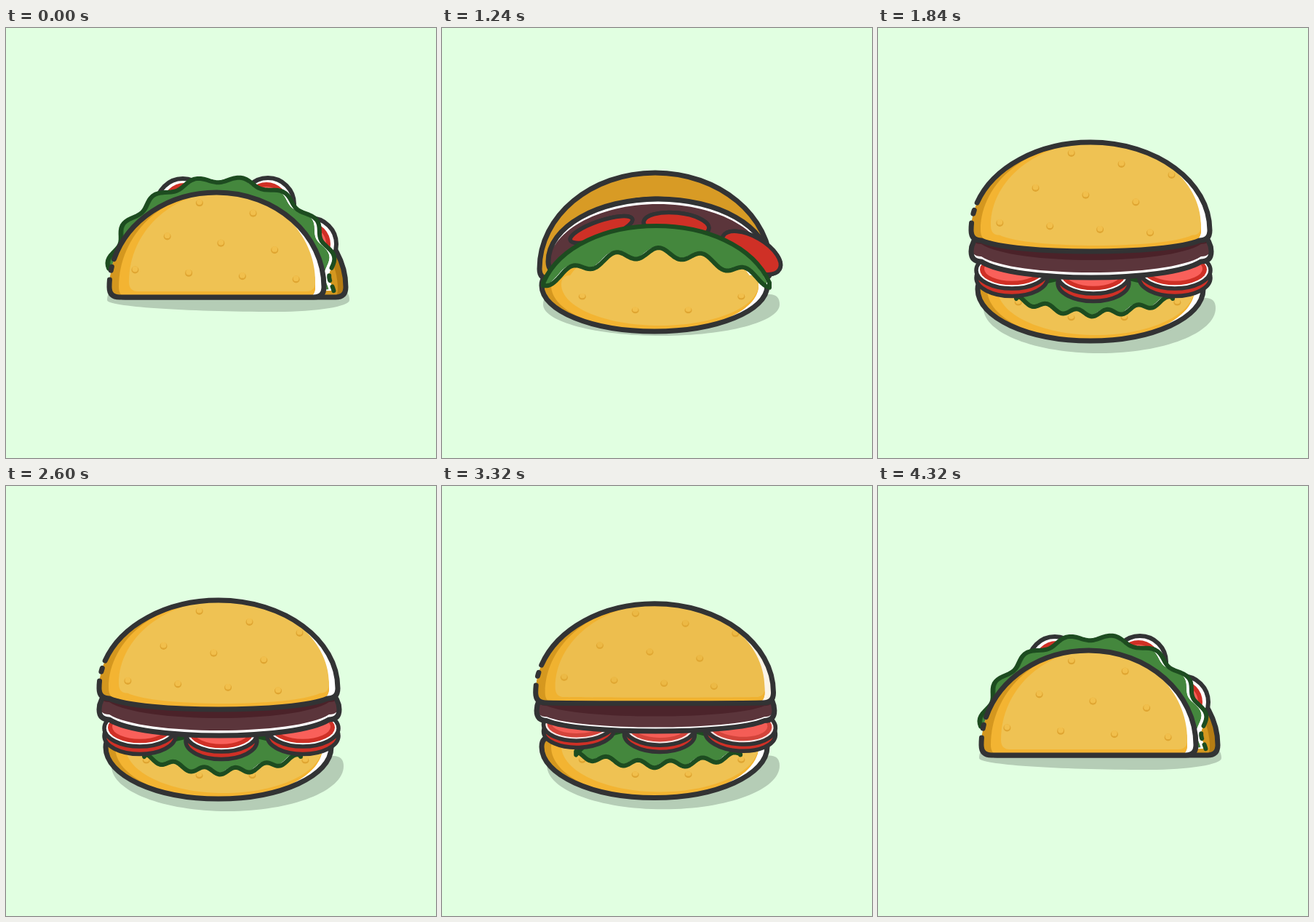
Write an HTML page with a canvas that moves like this. It is 591 px wide and 591 px high and loops after 4.64 s.

```html
<!DOCTYPE html>
<html>
<head>
<meta charset="utf-8">
<style>
html, body { margin: 0; width: 100%; height: 100%; overflow: hidden; background: #e1ffe1; }
canvas { display: block; width: 100vmin; height: 100vmin; }
</style>
</head>
<body>
<canvas></canvas>
<script>
const canvas = document.querySelector('canvas'), c = canvas.getContext('2d');
const LOOP = 4640, STEP = 40, SIZE = 591;
const INK = '#323334', LEAF_INK = '#1d4c20', BUN = '#efc253', ORANGE = '#f3b432',
  AMBER = '#d4971f', RED = '#cf3026', PINK = '#f9605a', SHADE = '#b5cdb6';
const GAPS = [10, 13, 5, 11, 9999];

const { PI, sin, cos, abs, min, max, sign } = Math;
const lerp = (a, b, k) => a.map((v, i) => v + (b[i] - v) * k);
const clamp = k => max(0, min(1, k));

// --- shapes ---

const arch = (x0, x1, y, sag) => {
  const inset = .15 * (x1 - x0), cy = y + sag * 4 / 3;
  return `C${x0 + inset} ${cy} ${x1 - inset} ${cy} ${x1} ${y}`;
};

// Half ellipse from the edge line to its tip (above or below), with round corners
// and a straight edge that bulges by sag.
function dome([left, right, tip, edge, sag, peak = .5]) {
  const q = 14, y = edge + sign(tip - edge) * q, x = left + (right - left) * peak;
  const cy = y + (tip - y) * .552;
  return new Path2D(`M${left} ${y} C${left} ${cy} ${x - (x - left) * .552} ${tip} ${x} ${tip}
    C${x + (right - x) * .552} ${tip} ${right} ${cy} ${right} ${y} Q${right} ${edge} ${right - q} ${edge}
    ${arch(right - q, left + q, edge, sag)} Q${left} ${edge} ${left} ${y}`);
}

function oval(x, y, rx, ry = rx, tilt = 0) {
  const p = new Path2D();
  p.ellipse(x, y, max(1, rx), max(1, ry), tilt, 0, 2 * PI);
  return p;
}

// Polyline through point(u) for u from 0 to 1
function trace(point, n = 120) {
  let d = '';
  for (let i = 0; i <= n; i++) d += (i ? 'L' : 'M') + point(i / n).join(' ');
  return d;
}

// --- painting ---

function fill(path, color, alpha = 1) {
  c.globalAlpha = alpha;
  c.fillStyle = color;
  c.fill(path);
  c.globalAlpha = 1;
}

function line(path, color = INK, width = 7, dash = []) {
  c.strokeStyle = color;
  c.lineWidth = width;
  c.setLineDash(dash);
  c.stroke(path);
}

function within(path, draw) {
  c.save();
  c.clip(path);
  draw();
  c.restore();
}

function dimple(x, y, squash, alpha) {
  fill(oval(x, y, 5, 5 * squash), '#dfa531', alpha);
  fill(oval(x, y - 1.3, 3.9, 3.9 * squash), '#f1bf4c', alpha);
}

// Three slanting rows of dimples, placed in the box of a dome
function rows([left, right, tip, edge, sag], step, alpha = 1) {
  const w = right - left, h = edge + max(0, sag) - tip;
  for (let r = 0; r < 3; r++)
    for (let i = 0; i < 3 + (r > 1); i++)
      dimple(left + w * (.42 - .15 * r + step * i),
        tip + h * (.1 + .32 * r + .1 * i * (1 - .35 * r)), min(1, h / 145), alpha);
}

// Bread: white rim on the right, two darker bands on the left
function bread(shape, drawDimples, dash) {
  const path = dome(shape);
  const [left, right, tip, edge, sag] = shape;
  const w = right - left, y = min(tip, edge), h = max(tip, edge + max(0, sag)) - y;
  within(path, () => {
    fill(path, '#fff');
    for (const [color, x, bottom] of [[AMBER, 0, 0], [ORANGE, 13, 0], [BUN, 27, 8]]) {
      c.save();
      c.translate(left + x, y);
      c.scale((w - x - 12) / w, (h - bottom) / h);
      c.translate(-left, -y);
      fill(path, color);
      c.restore();
    }
    drawDimples();
  });
  line(path, INK, 7, dash);
}

// Lettuce: white on edges facing right, dark on edges facing left
function leaf(path, rim) {
  within(path, () => {
    fill(path, '#fff');
    c.translate(-rim, -rim / 4);
    within(path, () => {
      fill(path, '#28622b');
      c.translate(rim + 4, rim / 4);
      fill(path, '#44873d');
    });
  });
}

// --- taco: k = 0 closed, 1 open ---

function drawTaco(k) {
  fill(dome(lerp([139, 472, 390, 360, 0, .7], [139, 467, 407, 362, 0, .5], k)), SHADE);

  const back = dome(lerp([150, 467, 233, 370, 0], [150, 476, 198, 369, 0], k));
  within(back, () => {
    fill(back, '#b57c13');
    c.translate(-11, 3);
    fill(back, AMBER);
  });
  line(back);

  const r = 36 + 3 * k;
  for (const [x0, y0] of [[243, 243], [360, 242], [418, 297]]) {
    const x = x0 - 12 * k, y = y0 - 9 * k, lean = sign(300 - x0) * 2;
    fill(oval(x, y, r), '#fff');
    fill(oval(x + lean, y, r - 6), RED);
    fill(oval(x + lean, y, r - 12), PINK);
    line(oval(x, y, r), INK, 6);
  }

  // Frill: ripples around an ellipse, from the right end to the left
  const [cx, cy, rx, ry] = lerp([296, 340, 153, 132], [287, 335, 163, 124], k);
  const frill = trace(u => {
    const a = (-9 + 185 * u) * PI / 180;
    const bump = 1 + .032 * cos((a - 172 * PI / 180) * 360 / 23);
    return [cx + rx * bump * cos(a), cy - ry * bump * sin(a)];
  });
  leaf(new Path2D(frill + 'L290 366Z'), 7);
  line(new Path2D(frill), LEAF_INK, 6, [6, 9, 7, 11, 9999]);

  const front = lerp([142, 437, 226, 370, 0], [125, 446, 257, 369, 0], k);
  bread(front, () => rows(front, .25), GAPS);
}

// --- burger: p = 0 unfolding, 1 stacked, above 1 stretched ---

function drawBurger(p) {
  const k = min(p, 1), stretch = max(p - 1, 0), shown = clamp(p);
  const pose = (a, b, pull) => lerp(lerp(a, b, k), lerp(b, b.map((v, i) => v + pull[i]), 1), 0)
    .map((v, i) => v + pull[i] * stretch);

  fill(dome(pose([139, 464, 423, 366, 0], [145, 464, 447, 371, 0], [0, 0, 4, 0, 0])), SHADE);

  const base = pose([137, 447, 417, 340, -50], [137, 447, 430, 345, 0], [0, 0, 7, 0, 0]);
  bread(base, () => {
    const [left, right, bottom, top] = base;
    for (let i = 0; i < 4; i++)
      dimple(left + (right - left) * (.18 + .235 * i),
        top + (bottom - top) * (.38 + .28 * sin(PI * i / 3)), .85, 1);
  });

  function drawLeaf() {
    // ends, their height, hang of the lower edge, rise of the upper one, ripple, phase
    const [x0, x1, y, hang, rise, ripple, phase] =
      pose([139, 450, 350, -41, -78, 7, .03], [190, 405, 372, 20, -32, 4.5, .1], [0, 0, 3, 2, 0, 0, 0]);
    const hem = trace(u => [x0 + (x1 - x0) * u,
      y + hang * sin(PI * u) + ripple * cos(2 * PI * 5.2 * (u - phase))]);
    const path = new Path2D(hem + 'L' + x1 + ' ' + y + arch(x1, x0, y, rise) + 'Z');
    leaf(path, 4);
    line(path, LEAF_INK, 6);
  }

  function drawTomatoes() {
    const [x0, gap, y0, rise, slope, rx, ry, grow, thick] =
      pose([322, 103, 293, -22, 16, 45, 17, 5, 0], [296, 112, 333, 7, 0, 49, 25, 0, 10.5],
        [1, 0, 1, 3, 0, 0, 0, 0, 0]);
    for (const i of [-1, 0, 1]) {
      const slice = (inset, dy = 0) => oval(x0 + gap * i, y0 + rise * (1 - abs(i)) + slope * i + dy,
        rx - inset, ry + grow * i - inset * .75, (.1 + .43 * i) * (1 - shown));
      fill(slice(0, thick), RED);
      line(slice(0, thick), INK, 5.5);
      fill(slice(0), RED);
      fill(slice(0), '#fff', shown);
      fill(slice(5, -1), RED, shown);
      fill(slice(11, -2), PINK, shown);
      line(slice(0), INK, 5.5);
    }
  }

  function drawPatty() {
    const path = dome(pose([146, 448, 235, 335, -45], [128, 458, 240, 321, 22], [-4, 4, 0, 2, 9]));
    within(path, () => {
      fill(path, '#fff');
      c.translate(0, 7 - 14 * shown);
      fill(path, '#5b353b');
      c.translate(0, -17 * shown);
      fill(path, '#4b2229', shown);
    });
    line(path);
  }

  function drawTop() {
    const shape = pose([134, 452, 199, 345, -110], [128, 456, 157, 292, 15], [-1, 1, -8, 1, 3]);
    bread(shape, () => {
      rows(shape, .21, shown);
      fill(dome(shape), '#d89b25', 1 - shown);
    }, shown > .6 ? GAPS : []);
  }

  // The stack turns over halfway: the top bun moves from the back to the front.
  const layers = [drawLeaf, drawTomatoes, drawPatty, drawTop];
  if (k < .5) layers.reverse();
  layers.forEach(draw => draw());
}

// --- timing: [ms, pose], eased between keys ---

const tacoKeys = [[0, 0], [640, 0], [1190, 1.4], [3400, 1.45], [3520, 1], [3560, .82], [4040, 0], [LOOP, 0]];
const burgerKeys = [[1200, -.25], [1240, 0], [1390, 3], [1540, .9], [1720, 1], [3040, 1],
  [3160, 2], [3220, 2.8], [3380, 0], [3400, -.1]];

function value(keys, t) {
  const i = max(1, keys.findIndex(k => k[0] >= t));
  const [t0, a] = keys[i - 1], [t1, b] = keys[i];
  const u = (t - t0) / (t1 - t0);
  return a + (b - a) * u * u * (3 - 2 * u);
}

function frame(now) {
  const t = Math.floor(now % LOOP / STEP) * STEP;
  const size = Math.round(min(innerWidth, innerHeight) * devicePixelRatio);
  if (canvas.width !== size) canvas.width = canvas.height = size;
  c.setTransform(size / SIZE, 0, 0, size / SIZE, 0, 0);
  c.lineCap = c.lineJoin = 'round';
  c.fillStyle = '#e1ffe1';
  c.fillRect(0, 0, SIZE, SIZE);
  if (t >= 1200 && t < 3400) drawBurger(value(burgerKeys, t));
  else drawTaco(value(tacoKeys, t));
  requestAnimationFrame(frame);
}
requestAnimationFrame(frame);
</script>
</body>
</html>
```
